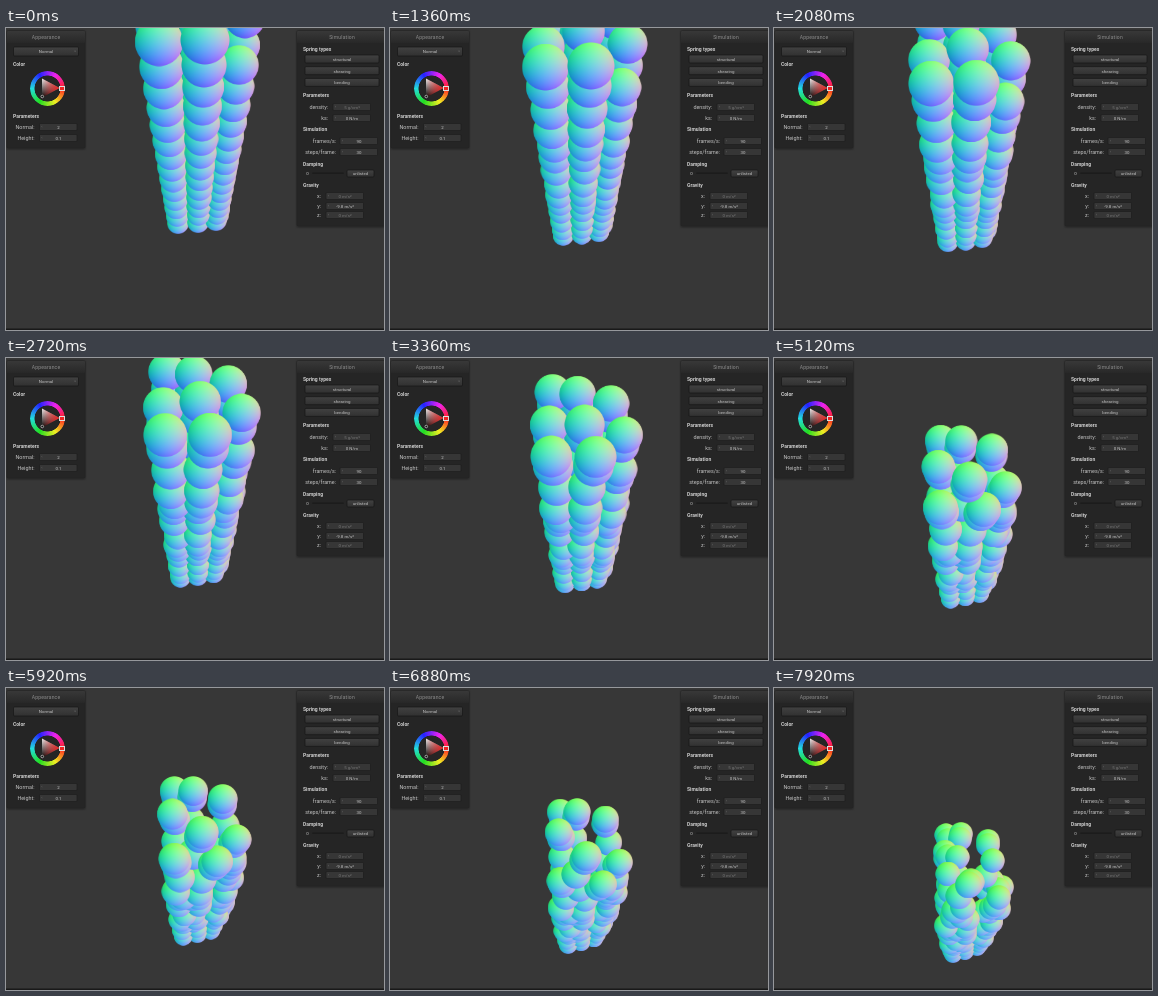
Recreate the animation shown at these times as an HTML page with a canvas. Size 378x302 px, loop 8 s.

```html
<!DOCTYPE html>
<html lang="en">
<head>
<meta charset="utf-8">
<title>Spring tower</title>
<style>
  html, body { margin: 0; width: 378px; height: 302px; overflow: hidden; background: #373737; }
  canvas, svg { position: absolute; left: 0; top: 0; }
  .wheel {
    position: absolute; left: 23.5px; top: 42.5px; width: 35px; height: 35px; border-radius: 50%;
    background: conic-gradient(from 90deg, #f22, #ee2, #2d2, #2dd, #22f, #e2e, #f22);
    -webkit-mask: radial-gradient(circle, transparent 12.7px, #000 13.3px);
    mask: radial-gradient(circle, transparent 12.7px, #000 13.3px);
  }
  .handle {
    position: absolute; left: 53px; top: 58px; width: 4px; height: 3px;
    border: 1px solid #ddd; background: #e22;
  }
  text { font: 5.4px Roboto, "Open Sans", sans-serif; fill: #c4c4c4; }
  .title { font-size: 5px; fill: #8f8f8f; text-anchor: middle; letter-spacing: .2px; }
  .head { font-size: 5px; font-weight: 700; fill: #cfcfcf; }
  .label { text-anchor: end; }
  .value { font-size: 4.4px; text-anchor: middle; }
  .dim { font-size: 4.4px; text-anchor: middle; fill: #777; }
</style>
</head>
<body>
<canvas id="stage" width="378" height="302"></canvas>
<svg id="ui" width="378" height="302" viewBox="0 0 378 302">
  <defs>
    <linearGradient id="bar" x2="0" y2="1"><stop stop-color="#383838"/><stop offset="1" stop-color="#282828"/></linearGradient>
    <linearGradient id="key" x2="0" y2="1"><stop stop-color="#414141"/><stop offset="1" stop-color="#313131"/></linearGradient>
    <linearGradient id="grey" x2="0" y2="1"><stop stop-color="#eee"/><stop offset="1" stop-color="#000"/></linearGradient>
    <linearGradient id="red"><stop stop-color="#e22" stop-opacity="0"/><stop offset="1" stop-color="#e22"/></linearGradient>
    <filter id="soft" x="-20%" y="-20%" width="140%" height="140%"><feGaussianBlur stdDeviation="1"/></filter>
  </defs>
  <rect y="300.5" width="378" height="1.5" fill="#191919"/>
</svg>
<div class="wheel"></div>
<div class="handle"></div>
<script>
const ui = document.getElementById('ui');
const add = s => ui.insertAdjacentHTML('beforeend', s);
const box = (x, y, w, h, fill, stroke) =>
  add(`<rect x="${x}" y="${y}" width="${w}" height="${h}" rx="1" fill="${fill}" stroke="${stroke}" stroke-width=".7"/>`);
const text = (x, y, s, cls) => add(`<text x="${x}" y="${y + 1.8}" class="${cls}">${s}</text>`);

function panel(x, w, h, title) {
  add(`<rect x="${x}" y="3" width="${w}" height="${h + 1}" fill="#111" opacity=".5" filter="url(#soft)"/>`);
  box(x, 3, w, h, '#252525', '#232323');
  box(x, 3, w, 12, 'url(#bar)', 'none');
  text(x + w / 2, 9.3, title, 'title');
}
function button(x, y, w, h, s) {
  box(x, y, w, h, 'url(#key)', '#161616');
  text(x + w / 2, y + h / 2, s, 'value');
}
function field(label, right, x, y, s, cls = 'value') {
  text(right, y, label, 'label');
  box(x, y - 3.5, 37.5, 7, '#363636', '#1d1d1d');
  text(x + 2.5, y - .5, '\u2039', 'dim');
  text(x + 19, y, s, cls);
}

panel(1, 78, 117, 'Appearance');
button(7.5, 19, 65, 9, 'Normal');
text(69, 23, '\u02c5', 'dim');
text(7, 36, 'Color', 'head');
add(`<path d="M53.5 60L36 50.5V69.5Z" fill="url(#grey)"/><path d="M53.5 60L36 50.5V69.5Z" fill="url(#red)"/>
  <circle cx="36.3" cy="68.5" r="1.3" fill="#111" stroke="#ddd" stroke-width=".7"/>`);
text(7, 88, 'Parameters', 'head');
field('Normal:', 28.5, 33.5, 99, '2');
field('Height:', 28.5, 33.5, 110, '0.1');

panel(291, 90, 195, 'Simulation');
text(297, 21, 'Spring types', 'head');
['structural', 'shearing', 'bending'].forEach((s, i) => button(299, 27 + i * 11.7, 74, 8, s));
text(297, 67, 'Parameters', 'head');
field('density:', 322, 327, 79, '5 g/cm\u00b3', 'dim');
field('ks:', 322, 327, 90, '0 N/m');
text(297, 101, 'Simulation', 'head');
field('frames/s:', 330, 334, 113, '90');
field('steps/frame:', 330, 334, 124, '30');
text(297, 136, 'Damping', 'head');
text(301.5, 145, '0', 'value');
box(306, 144.5, 32, 1.2, '#1a1a1a', 'none');
button(341, 142, 27, 7, 'unlisted');
text(297, 157, 'Gravity', 'head');
field('x:', 315, 320, 168, '0 m/s\u00b2', 'dim');
field('y:', 315, 320, 178, '-9.8 m/s\u00b2');
field('z:', 315, 320, 187, '0 m/s\u00b2', 'dim');

const ctx = document.getElementById('stage').getContext('2d');
const mix = (a, b, k) => a + (b - a) * k;
const LAYERS = 14, SIZE = 64, SHADES = 16;

// Ball coloured by its world normal, seen from above at the given pitch
function makeBall(pitch) {
  const c = document.createElement('canvas');
  c.width = c.height = SIZE;
  const g = c.getContext('2d'), img = g.createImageData(SIZE, SIZE);
  const cp = Math.cos(pitch), sp = Math.sin(pitch), R = SIZE / 2;
  for (let j = 0; j < SIZE; j++) for (let i = 0; i < SIZE; i++) {
    const px = (i + .5) / R - 1, py = 1 - (j + .5) / R, d = Math.hypot(px, py);
    // the rim normal stays short of a full right angle
    const x = px * .82, y = py * .82, z = Math.sqrt(Math.max(0, 1 - x * x - y * y));
    const wy = y * cp + z * sp, wz = z * cp - y * sp;
    const n = [x * .97 - wz * .22, wy, wz * .97 + x * .22];
    const o = (j * SIZE + i) * 4;
    n.forEach((v, k) => { img.data[o + k] = 128 + 127 * v; });
    img.data[o + 3] = 255 * Math.min(1, Math.max(0, (1 - d) * R));
  }
  g.putImageData(img, 0, 0);
  return c;
}
const balls = Array.from({ length: SHADES }, (_, i) => makeBall((36 + i * 2.1) * Math.PI / 180));

// Per column: top start x y r, top end x y r, foot start x y, foot end x y
const columns = [
  [156, -46, 20, 172, 147, 11.7, 174, 183, 178, 246],
  [188, -42, 20, 187, 146, 12, 192, 182, 192, 243],
  [226, -31, 20, 214, 153, 12, 214, 182, 214, 235],
  [151, -2, 22, 171, 164, 12.2, 173, 189, 180, 256],
  [193, -24, 22, 197, 194, 13.6, 192, 188, 192, 252],
  [239, -10, 20.5, 228, 199, 12, 212, 188, 214, 242],
  [153, 14, 24.5, 173, 217, 12, 172, 195, 179, 266],
  [199, 12, 24.8, 215, 221, 11.8, 192, 194, 191, 263],
  [233, 37, 20, 225, 215, 10.5, 210, 192, 203, 259]
];
const lean = [0, -10, 2];

const fallKeys = [[0, 0], [1.36, .124], [2.08, .205], [3.36, .416], [4.4, .573], [5.92, .772], [7.92, 1]];
function fall(t) {
  const i = Math.max(1, fallKeys.findIndex(k => k[0] >= t));
  const [a, p] = fallKeys[i - 1], [b, q] = fallKeys[i];
  return mix(p, q, (t - a) / (b - a));
}

function tower(t) {
  const p = fall(t), q = t / 7.92, bump = Math.sin(Math.PI * p), list = [];
  columns.forEach((c, k) => {
    const tx = mix(c[0], c[3], p), ty = mix(c[1], c[4], p), tr = mix(c[2], c[5], p) + 1.9 * bump;
    const fx = mix(c[6], c[8], q), fy = mix(c[7], c[9], q);
    const fr = mix(10 + (k / 3 | 0) * .5, 9, q);
    for (let l = 0; l < LAYERS; l++) {
      // layers bunch up into clusters as the springs compress
      const w = l / (LAYERS - 1);
      const u = w - Math.min(.95, p * 1.7) * Math.sin(6 * Math.PI * w) / (6 * Math.PI);
      const f = 1.9 * u / (1 + .9 * u);
      const bend = Math.sin(Math.PI * f) * p;
      const sway = lean[k % 3] * bend + Math.sin(l * 2.4 + k * 1.7) * 5 * bend;
      list.push({
        x: mix(tx, fx, f ** (1 - .5 * p)) + sway,
        y: mix(ty, fy, f),
        r: mix(tr, fr, f) + 1.5 * bend
      });
    }
  });
  return list.sort((a, b) => a.r - b.r);
}

function draw(t) {
  ctx.clearRect(0, 0, 378, 302);
  for (const { x, y, r } of tower(t)) {
    const shade = Math.max(0, Math.min(SHADES - 1, Math.round(y * .062)));
    ctx.drawImage(balls[shade], x - r, y - r, r * 2, r * 2);
  }
}

ctx.imageSmoothingQuality = 'high';
const start = performance.now();
function tick() {
  const ms = (performance.now() - start) % 8000;
  draw(Math.floor(ms / 80) * .08);
  requestAnimationFrame(tick);
}
tick();
</script>
</body>
</html>
```
